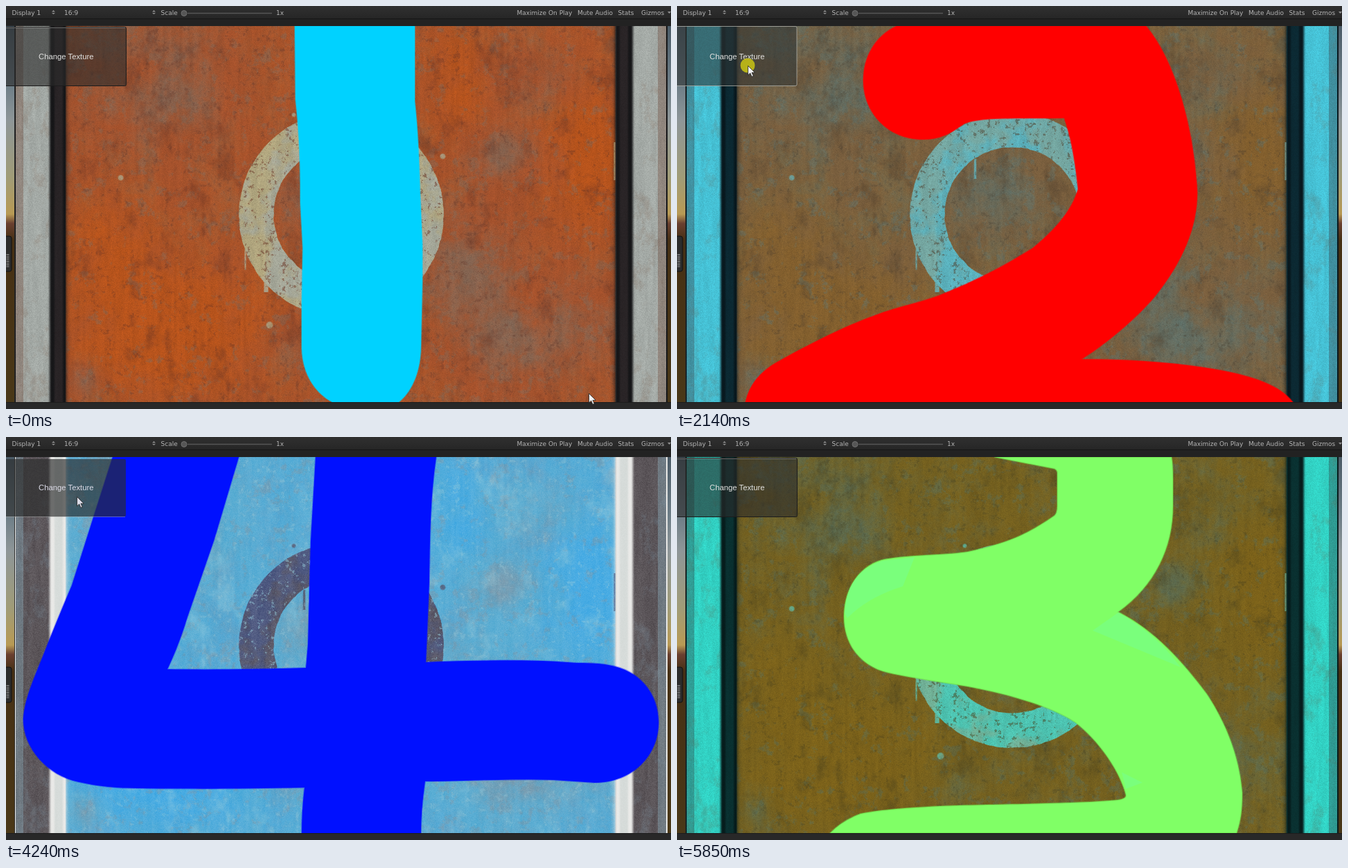
These frames come from a looping animation (960 by 583 pixels, 6560 ms). An HTML page with a canvas:

```html
<!DOCTYPE html>
<html lang="en">
<head>
<meta charset="utf-8">
<title>Change Texture</title>
<style>
  html, body { margin: 0; width: 100%; height: 100%; overflow: hidden; background: #282828; }
  canvas, svg { position: absolute; left: 0; top: 0; }
  text { font: 9px "DejaVu Sans", sans-serif; fill: #b4b4b4; }
  #label { font: 11.3px "Liberation Sans", Arial, sans-serif; fill: #e2e2e0; }
  #digits g { display: none; stroke-width: 2; stroke-opacity: .4; }
  #digits g.on { display: inline; }
  #btn g { display: none; }
  [data-state=normal] .normal, [data-state=hover] .hover, [data-state=active] .active { display: inline !important; }
</style>
</head>
<body>
<canvas id="wall" width="960" height="583"></canvas>
<svg id="stage" width="960" height="583" viewBox="0 0 960 583">
  <defs>
    <linearGradient id="sky" x2="0" y2="1">
      <stop offset="0" stop-color="#4c5c68"/><stop offset=".16" stop-color="#6f7f88"/>
      <stop offset=".25" stop-color="#8e9698"/><stop offset=".4" stop-color="#a09c78"/>
      <stop offset=".5" stop-color="#b89a54"/><stop offset=".525" stop-color="#6a4030"/>
      <stop offset=".57" stop-color="#463014"/><stop offset="1" stop-color="#4a3818"/>
    </linearGradient>
    <linearGradient id="bar" x2="0" y2="1">
      <stop offset="0" stop-color="#303030"/><stop offset="1" stop-color="#262626"/>
    </linearGradient>
  </defs>
  <path d="M0 29H12V573H0ZM955 29H960V573H955Z" fill="url(#sky)"/>

  <g id="digits">
    <g fill="#00d2ff" stroke="#00d2ff"><path d="M417 29H590V138C593 165 596 200 597.500 265L601 345V400L599 490C599 525 588 556 567 573H471C444 558 428 530 427 495V430L428.500 350L425 285C425 230 424 190 418 135Z"/></g>
    <g fill="#f00" stroke="#f00"><path d="M317 29C285 44 269 75 269 107C269 155 305 193 355 193C385 193 400 180 415 170C440 160 490 163 559 162C569 190 575 225 579 265C573 285 560 312 514 350C470 378 425 400 390 414C360 428 320 434 285 448C240 464 190 490 145 515C118 530 104 550 99 573H889C870 548 830 536 790 528C720 515 650 511 584 511C620 488 660 455 690 420C730 370 751 320 751 270C747 180 720 80 677 29Z"/></g>
    <g fill="#80ff66" stroke="#6bd848">
      <path d="M458 29L545 46Q549 48 549 52V100Q549 112 543 115C500 145 470 155 420 166C380 172 330 170 295 178C262 188 241 220 241 260C241 300 265 332 305 341C345 350 390 356 420 361C480 372 540 390 575 413C610 440 640 485 648 518Q649 523 637 525C580 531 450 531 380 534C320 537 290 540 265 545Q238 555 221 573H808C814 555 816 540 816 515C812 460 790 410 765 372C730 325 690 280 637 253C690 215 716 160 716 100V60Q716 40 714 29Z"/>
      <path fill="#7aff7c" stroke="none" d="M246 262Q275 232 326 216L343 174L297 179Q245 195 242 255ZM637 254L600 280Q660 305 727 333Q690 283 637 254ZM642 485L672 500L648 509Z"/>
    </g>
    <g fill="#0010ff" stroke="#0010ff"><path d="M154 29H336L300 150L262 260Q250 300 233 336C300 337 370 336 433 334L436 300L440 150L447 29H621C612 90 612 150 611 210L606 326C680 323 760 322 810 326C830 328 850 326 870 330C915 337 942 372 942 413C942 460 905 500 850 500L790 496C720 494 660 498 605 498Q599 540 599 573H427Q427 540 431 507C340 509 260 509 190 508C160 508 130 505 105 499C60 490 25 450 25 408C27 375 45 340 60 300Q80 250 95 215L125 120Z"/></g>
  </g>

  <g id="btn">
    <g class="normal">
      <rect x="-4" y="30.5" width="177.5" height="85" rx="2" fill="#2a2a2a" fill-opacity=".6" stroke="#1c1c1c"/>
      <path d="M0 31.5H172" stroke="#aaa" stroke-opacity=".5"/>
    </g>
    <g class="hover"><rect x="-4" y="29.5" width="177" height="86" rx="2" fill="#303434" fill-opacity=".6" stroke="#b0b0a8" stroke-opacity=".8"/></g>
    <g class="active">
      <rect x="-4" y="32" width="177" height="83" rx="2" fill="#2a2c2c" fill-opacity=".65"/>
      <path d="M0 115.5H172" stroke="#aaa" stroke-opacity=".5"/>
    </g>
    <text id="label" x="47" y="77">Change Texture</text>
  </g>

  <rect width="960" height="29" fill="#222"/>
  <rect width="960" height="18" fill="url(#bar)"/>
  <path d="M0 18.5H960" stroke="#171717"/>
  <rect y="573" width="960" height="10" fill="#282828"/>
  <path d="M0 573.5H960" stroke="#1c1c1c"/>
  <g>
    <text x="8.500" y="12.500">Display 1</text><text x="84" y="12.500">16:9</text>
    <text x="223.500" y="13">Scale</text><text x="390" y="13">1x</text>
    <text x="737.500" y="12.500">Maximize On Play</text><text x="825" y="12.500">Mute Audio</text>
    <text x="883.500" y="12.500">Stats</text><text x="917" y="12.500">Gizmos</text>
  </g>
  <path fill="#909090" d="M66 8.500L68.500 6L71 8.500ZM66 10L68.500 12L71 10ZM211 8.500L213.500 6L216 8.500ZM211 10L213.500 12L216 10ZM955 8L957.500 11L960 8Z"/>
  <path d="M262 10.500H384" stroke="#565656" stroke-width="1.500"/>
  <circle cx="257" cy="10.500" r="4" fill="#565656" stroke="#707070"/>
  <rect x="-4" y="333" width="12" height="51" rx="3" fill="#2c2c2c" stroke="#111"/>
  <path d="M2.500 359V379" stroke="#999" stroke-width="4" stroke-dasharray="1 1.500"/>

  <circle id="click" cx="102" cy="86" r="10.500" fill="#c6c014" fill-opacity=".88"/>
  <path id="cursor" d="M.5 .5V14L3.700 11L6 16.300L8.300 15.300L6 10.300H10.300Z" stroke="#222" stroke-width=".8"/>
</svg>
<script>
const TOP = 29, BOTTOM = 573, LEFT = 13, RIGHT = 955, LOOP = 6560;
const $ = id => document.getElementById(id);

// Seeded value noise
let seed = 7;
const rand = () => (seed = (seed * 16807) % 2147483647) / 2147483647;
const lattice = Float32Array.from({ length: 65536 }, rand);
const at = (x, y) => lattice[(y & 255) << 8 | (x & 255)];
function noise(x, y) {
  const i = Math.floor(x), j = Math.floor(y);
  let u = x - i, v = y - j;
  u *= u * (3 - 2 * u);
  v *= v * (3 - 2 * v);
  const a = at(i, j), b = at(i, j + 1);
  const p = a + (at(i + 1, j) - a) * u, q = b + (at(i + 1, j + 1) - b) * u;
  return p + (q - p) * v;
}
function fbm(x, y) {
  let sum = 0;
  for (let k = 0, amp = .4; k < 4; k++, amp *= .65) {
    sum += amp * noise(x, y);
    x = x * 2.1 + 17;
    y = y * 2.1 + 31;
  }
  return sum * 1.065;
}
const smooth = (a, b, v) => {
  v = Math.min(1, Math.max(0, (v - a) / (b - a)));
  return v * v * (3 - 2 * v);
};

// Each tone holds the colours of the first three walls; the fourth is the first inverted.
const tone = list => list.match(/../g).map(h => parseInt(h, 16));
const base = tone('a5522c7a5f3e74601f'), warm = tone('b8541c84602e7c621a'),
  grey = tone('8068585e726c586e5a'), dark = tone('6834244e3e2c48401c'),
  ringA = tone('b0a98274aaa670b49c'), ringB = tone('a2a8a054b4c444c8b8'),
  strip = tone('a4aaa646c2d632d2c4'), edge = tone('90867e4090a02f9c94'),
  frame = tone('16161808181e061c1c'), mid = tone('2c26280c2c360a3434');

// Soft patches: x, y, radii, strength; positive is weathered, negative is fresh rust
const patches = [[235, 110, 80, 85, .6], [130, 110, 40, 70, .3], [715, 215, 45, 32, .7],
  [725, 490, 60, 60, .8], [780, 110, 70, 45, .3], [665, 370, 60, 70, .65], [830, 450, 60, 70, .3],
  [460, 270, 70, 60, .45], [420, 490, 70, 40, .3], [110, 540, 25, 25, .5],
  [240, 470, 130, 80, -.7], [150, 350, 60, 60, -.4], [840, 210, 60, 110, -.5], [650, 110, 40, 70, -.4]];
const spots = [[165, 248, 4], [630, 217, 4], [380, 461, 5], [415, 157, 3]];
const drips = [[375, 390, 414, 3], [345, 350, 382, 1], [430, 220, 250, 1.5], [878, 196, 252, 1]];

const px = new Float32Array(9);
function lay(color, k) {
  for (let c = 0; c < 9; c++) px[c] += (color[c] - px[c]) * k;
}

function panel(x, y) {
  let worn = 0;
  for (const [cx, cy, rx, ry, k] of patches) {
    const d = ((x - cx) / rx) ** 2 + ((y - cy) / ry) ** 2;
    if (d < 5) worn += k * Math.exp(-d);
  }
  const fine = fbm(x / 7, y / 7), blotch = fbm(x / 40, y / 46);
  lay(base, 1);
  lay(warm, smooth(.1, .7, blotch * .6 - worn * .7));
  lay(grey, smooth(.35, 1.1, blotch * .7 + fine * .25 + worn * .55) * .9);
  lay(grey, smooth(.58, .76, fbm(x / 15 + 90, y / 15) + worn * .05) * .45);
  lay(dark, smooth(.5, .85, fbm(x / 26, y / 34 + 70)) * .4);
  lay(dark, smooth(.6, .8, fine) * .35);
  lay(frame, .6 * Math.exp(-Math.min(x - 86, 879 - x) / 2.5));

  const r = Math.hypot(x - 483.5, y - 301.3) + (fine - .5) * 2;
  let paint = smooth(97, 98.5, r) * smooth(148.5, 147, r);
  for (const [cx, cy, s] of spots) paint = Math.max(paint, smooth(s + 1, s - 1.5, Math.hypot(x - cx, y - cy)) * .7);
  for (const [cx, a, b, w] of drips) if (y > a && y < b) paint = Math.max(paint, smooth(w + 1, w - 1, Math.abs(x - cx)) * .7);
  if (paint) {
    lay(ringA, paint * .95);
    lay(ringB, paint * smooth(.35, .65, fbm(x / 45 + 20, y / 45)) * .8);
    lay(dark, paint * smooth(.6, .72, fbm(x / 5, y / 5 + 40)) * .5);
  }
}

function column(x, y) {
  if (x < 14 || x >= 953) return lay(frame, 1);
  lay(x < 25 || x >= 941 ? edge : strip, 1);
  lay(grey, smooth(.5, .8, fbm(x / 14, y / 20)) * .25);
  const fromFrame = x < 480 ? Math.abs(x - 75.5) : Math.abs(x - 891.5);
  lay(frame, smooth(16, 10, fromFrame));
  lay(mid, smooth(8, 4, fromFrame) * .85);
}

function buildWalls() {
  const walls = [0, 1, 2, 3].map(() => new ImageData(RIGHT - LEFT, BOTTOM - TOP));
  for (let y = TOP, o = 0; y < BOTTOM; y++) {
    for (let x = LEFT; x < RIGHT; x++, o += 4) {
      (x >= 86 && x < 880 ? panel : column)(x, y);
      const light = 1 + (noise(x / 4, y / 40) - .5) * .07 + (rand() - .5) * .11;
      walls.forEach(({ data }, n) => {
        for (let c = 0; c < 3; c++) data[o + c] = n < 3 ? px[n * 3 + c] * light : 255 - px[c] * light;
        data[o + 3] = 255;
      });
    }
  }
  return walls;
}

const walls = buildWalls(), ctx = $('wall').getContext('2d');
const digits = [...$('digits').children];
const tints = ['#e2e2e0', '#a8f0f0', '#b6f5c8', '#dcdce8'];
const clicks = [[960, 1060], [2140, 2220], [3150, 3310], [4150, 4240], [5080, 5240]];
const wallAt = t => t < 1060 ? 0 : t < 2220 ? 1 : t < 4240 ? 2 : t < 5240 ? 3 : 2;

// Cursor moves: start, end, steps, from, to, easing exponent
const moves = [
  [70, 120, 2, [841, 560], [252, 99], 1],
  [270, 730, 7, [252, 99], [102, 86], 1],
  [5620, 5773, 3, [102, 86], [794, 568], 2]
];
function cursorAt(t) {
  let pos = moves[0][3];
  for (const [start, end, steps, from, to, power] of moves) {
    if (t < start) break;
    const k = Math.min(steps, 1 + Math.floor((t - start) / (end - start) * (steps - 1)));
    const p = (k / steps) ** power;
    pos = from.map((v, i) => v + (to[i] - v) * p);
  }
  return pos;
}

let shown = -1;
function draw(t) {
  const n = wallAt(t);
  if (n !== shown) {
    ctx.putImageData(walls[n], LEFT, TOP);
    digits.forEach((d, i) => d.classList.toggle('on', i === n));
    shown = n;
  }
  const pressed = clicks.some(([a, b]) => t >= a && t < b);
  const state = pressed ? 'hover' : t < 960 || t >= 5620 ? 'normal' : 'active';
  const tint = state === 'active' ? tints[n] : tints[0];
  $('stage').dataset.state = state;
  $('label').style.fill = tint;
  $('click').style.display = pressed ? '' : 'none';
  $('cursor').style.display = t < 5850 ? '' : 'none';
  $('cursor').setAttribute('transform', `translate(${cursorAt(t)})`);
  $('cursor').setAttribute('fill', state === 'active' ? tint : '#f2f2f2');
}

draw(0);
const begin = performance.now();
function tick() {
  draw((performance.now() - begin) % LOOP);
  requestAnimationFrame(tick);
}
requestAnimationFrame(tick);
</script>
</body>
</html>
```
